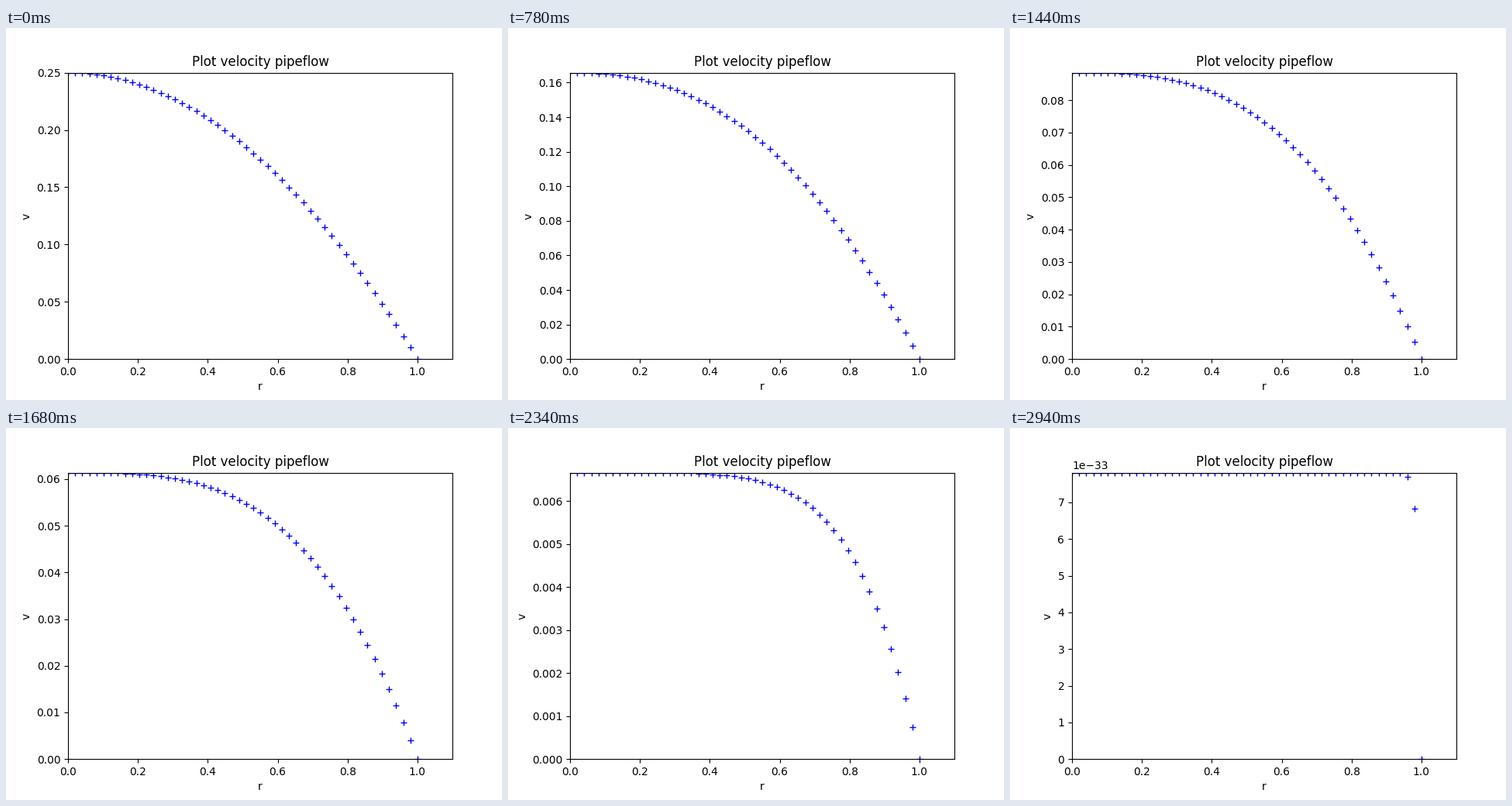
A matplotlib script for the animation above (3000 ms loop, 640 by 480 pixels).

```python
import numpy as np
import matplotlib.pyplot as plt
from matplotlib.animation import FuncAnimation

FRAMES = 50
R = 1.0
BETA = 0.02   # pressure gradient
MU0 = 0.02    # viscosity coefficient

r = np.linspace(0, R, 50)
exponents = np.linspace(1, 0.01, FRAMES)


def velocity(r, n):
    """Power-law fluid velocity at radius r in a pipe of radius R."""
    scale = (BETA / (2 * MU0)) ** (1 / n) * n / (n + 1)
    return scale * (R ** (1 + 1 / n) - r ** (1 + 1 / n))


fig, ax = plt.subplots(figsize=(6.4, 4.8), dpi=100)
line, = ax.plot(r, velocity(r, 1), 'b+')
ax.set_xlim(0, 1.1 * R)
ax.set_xlabel('r')
ax.set_ylabel('v')
ax.set_title('Plot velocity pipeflow')


def update(i):
    v = velocity(r, exponents[i])
    line.set_ydata(v)
    ax.set_ylim(0, v[0])
    return line,


anim = FuncAnimation(fig, update, frames=FRAMES, interval=60,
                     repeat=True, repeat_delay=0, blit=False)
plt.show()
```
